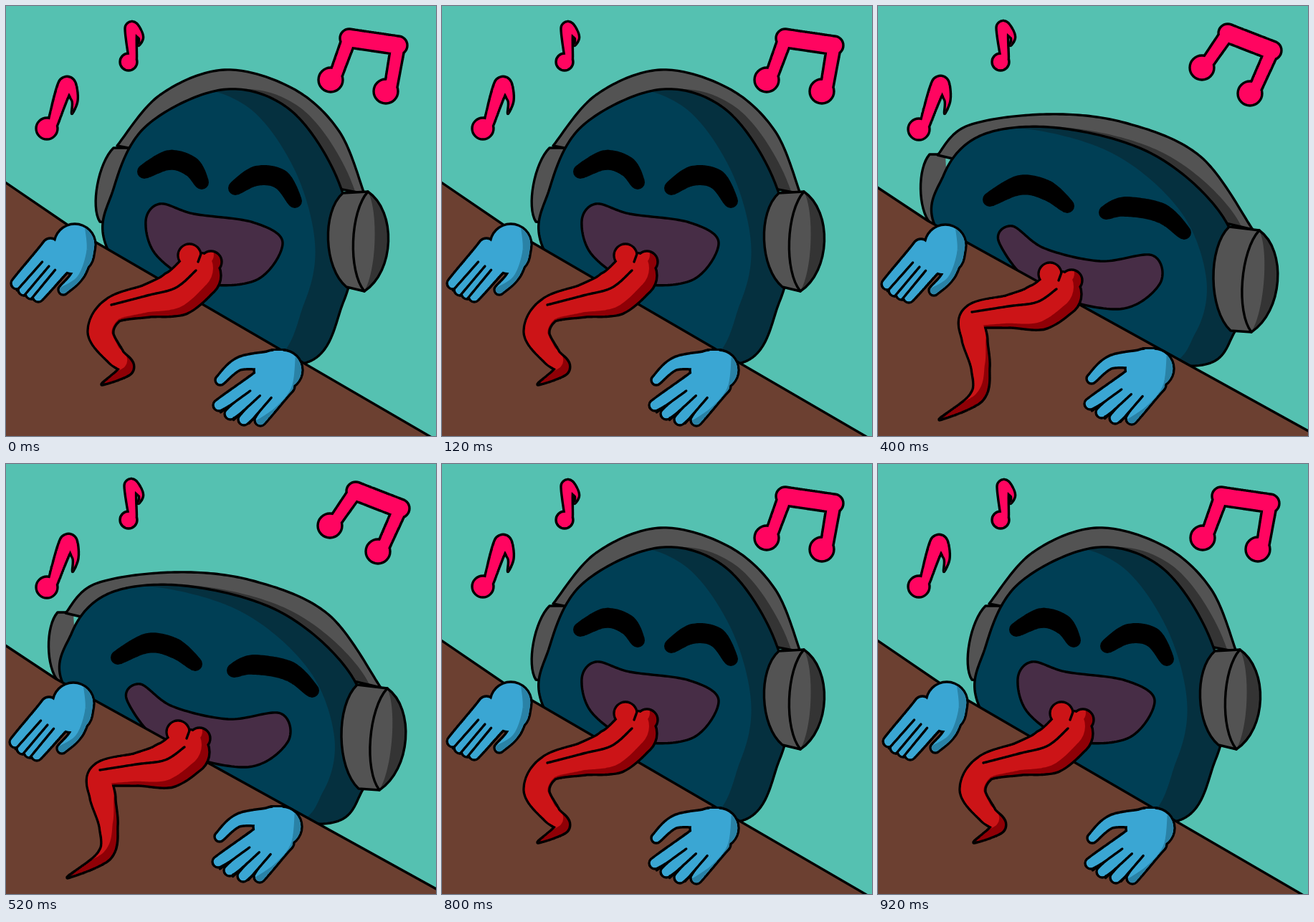
Recreate the animation shown at these times as an HTML page with a canvas. Size 600 by 600 pixels, loop 1 s.

```html
<!DOCTYPE html>
<html lang="en">
<head>
<meta charset="utf-8">
<title>Headphone bop</title>
<style>
  html, body { margin: 0; width: 100%; height: 100%; overflow: hidden; background: #55c1b1; }
  canvas { display: block; width: 100vmin; height: 100vmin; }
</style>
</head>
<body>
<canvas id="stage" width="600" height="600"></canvas>
<script>
const ctx = document.getElementById('stage').getContext('2d');

const INK = '#000', SKY = '#55c1b1', WOOD = '#6c4031', MOUTH = '#472d46', PINK = '#ff0560';
const BODY = ['#003f55', '#05303f'];
const GREY = ['#535353', '#343434'];
const RED = ['#cc1417', '#8f0006'];
const BLUE = ['#3aa6d3', '#2a82a6'];
const LINE = 3.4;

// Key points of each pose; curves run smoothly through them.
const up = {
  table: '-4,244 100,315 594,602',
  body: '142,340 150,255 195,168 300,117 390,140 455,225 485,330 470,415 418,498 250,480',
  band: '155,195 215,124 305,89 400,115 465,175 500,262',
  cupL: '150,198 131,301',
  cupR: '470,261 475,392 505,259 500,398',
  eyes: ['193,231 228,215 258,224 273,246', '320,254 350,237 383,242 403,272'],
  mouth: '195,300 215,276 262,290 345,302 386,330 350,382 270,386 210,348',
  tongue: '268,376 240,400 200,411 150,424 132,455 152,488 168,506 134,528',
  hands: '0,0 0,0',
  pair: '453,103 479,45 547,55 530,119',
  notes: [['57,171 84,110 92,150', 15], ['171,78 175,31 185,55', 12]]
};
const mid = {
  table: '-4,252 80,307 604,600',
  body: '108,330 110,230 160,158 275,131 385,170 472,250 513,350 493,437 430,497 250,470',
  band: '116,186 165,128 240,96 340,108 445,167 513,294',
  cupL: '108,186 82,288',
  cupR: '492,291 485,432 526,292 524,439',
  eyes: ['157,246 190,223 230,232 258,247', '311,257 345,243 390,254 424,284'],
  mouth: '185,300 205,282 258,305 345,306 382,340 345,382 265,386 205,345',
  tongue: '271,376 240,405 200,416 155,428 140,455 148,490 146,520 125,549',
  hands: '-5,1 3,-5',
  pair: '471,125 461,64 527,38 545,97',
  notes: [['59,161 79,119 81,144', 11], ['159,71 187,32 186,62', 12]]
};
const down = {
  table: '-4,251 70,300 604,595',
  body: '87,320 92,235 145,180 250,170 380,205 475,285 512,380 497,456 443,502 250,470',
  band: '83,208 125,167 235,151 345,163 450,210 523,312',
  cupL: '72,207 73,303',
  cupR: '490,308 492,453 532,313 521,455',
  eyes: ['156,270 198,250 235,257 264,279', '318,288 345,280 395,289 427,316'],
  mouth: '169,330 187,307 232,338 310,356 383,348 393,388 335,423 225,395',
  tongue: '252,402 225,420 185,426 134,434 135,465 143,505 138,545 86,577',
  hands: '-2,1 -1,-2',
  pair: '452,86 488,38 550,62 519,122',
  notes: [['57,172 86,109 93,150', 15], ['171,78 174,30 185,55', 12]]
};

const HANDS = [
  { palm: '96,333 94,345', thumb: '108,345 100,375 80,396',
    tips: '15,387 25,396 35,401 45,405', roots: '62,336 72,341 80,347 88,352',
    edge: '122,308 124,345 108,386 72,408', size: 29 },
  { palm: '386,508 374,508', thumb: '370,495 326,499 299,522',
    tips: '297,557 313,569 332,577 355,578', roots: '355,520 365,526 378,530 391,530',
    edge: '416,486 410,535 385,568 350,592', size: 28 }
];

const STEP = 200;
const STEPS = [up, mid, down, mid, up];

const points = s => s.split(' ').map(p => p.split(',').map(Number));
const move = (pts, dx, dy) => pts.map(([x, y]) => [x + dx, y + dy]);
const mix = (a, b, t) => a + (b - a) * t;
const mixPt = (p, q, t) => [mix(p[0], q[0], t), mix(p[1], q[1], t)];

// Catmull-Rom samples, each with its progress from 0 to 1.
function sample(pts, loop) {
  const n = pts.length, spans = loop ? n : n - 1, per = 24, out = [];
  const at = i => loop ? pts[(i + n) % n] : pts[Math.max(0, Math.min(n - 1, i))];
  for (let k = 0; k <= spans * per; k++) {
    const i = Math.min(spans - 1, Math.floor(k / per)), u = k / per - i;
    const [a, b, c, d] = [-1, 0, 1, 2].map(j => at(i + j));
    const axis = m => b[m] + u / 2 * (c[m] - a[m] +
      u * (2 * a[m] - 5 * b[m] + 4 * c[m] - d[m] + u * (3 * (b[m] - c[m]) + d[m] - a[m])));
    out.push([axis(0), axis(1), k / (spans * per)]);
  }
  return out;
}

function curve(pts, loop) {
  const path = new Path2D();
  sample(pts, loop).forEach(([x, y]) => path.lineTo(x, y));
  if (loop) path.closePath();
  return path;
}

function stroke(path, width = LINE, color = INK) {
  ctx.lineWidth = width;
  ctx.strokeStyle = color;
  ctx.stroke(path);
}

function fill(path, color) {
  ctx.fillStyle = color;
  ctx.fill(path);
}

function within(path, paint) {
  ctx.save();
  ctx.clip(path);
  paint();
  ctx.restore();
}

// A tube is [points, radii]; the radii spread evenly along its length.
function tubes(list, grow) {
  const path = new Path2D();
  for (const [pts, radii] of list) {
    for (const [x, y, t] of sample(pts)) {
      const f = t * (radii.length - 1), i = Math.min(radii.length - 2, Math.floor(f));
      const r = Math.max(0.2, mix(radii[i], radii[i + 1], f - i) + grow);
      path.moveTo(x + r, y);
      path.arc(x, y, r, 0, Math.PI * 2);
    }
  }
  return path;
}

function inked(list, color) {
  fill(tubes(list, LINE / 2), INK);
  const inside = tubes(list, -LINE / 2);
  fill(inside, color);
  return inside;
}

const disc = (p, r) => [[p, p], [r, r]];

// Adds a sideways bulge between two points.
function bow(path, a, b, off) {
  const o = off * 4 / 3, p = mixPt(a, b, 0.2), q = mixPt(a, b, 0.8);
  path.bezierCurveTo(p[0] + o, p[1], q[0] + o, q[1], ...b);
}

function lens(a, b, left, right) {
  const path = new Path2D();
  path.moveTo(...a);
  bow(path, a, b, right);
  bow(path, b, a, left);
  return path;
}

function leftCup([top, low]) {
  const path = new Path2D();
  path.moveTo(top[0] + 22, top[1]);
  path.lineTo(...top);
  bow(path, top, low, -13);
  path.lineTo(low[0] + 26, low[1] + 4);
  fill(path, GREY[0]);
  stroke(path);
}

function rightCup([backTop, backLow, top, low]) {
  const side = new Path2D();
  side.moveTo(...top);
  side.lineTo(...backTop);
  bow(side, backTop, backLow, -23);
  side.lineTo(...low);
  fill(side, GREY[0]);
  stroke(side);
  const pad = lens(top, low, -18, 31);
  fill(pad, GREY[0]);
  fill(lens(top, low, 12, 31), GREY[1]);
  stroke(pad);
}

function head(pose) {
  const pts = points(pose.body), body = curve(pts, true);
  const band = curve(points(pose.band));
  band.closePath();
  fill(band, GREY[0]);
  within(band, () => fill(curve(move(pts, 18, 0), true), GREY[1]));
  stroke(band);
  fill(body, BODY[1]);
  within(body, () => fill(curve(move(pts, -54, 0), true), BODY[0]));
  stroke(body);
}

function table(pts) {
  const path = new Path2D(), top = new Path2D();
  pts.forEach(p => { path.lineTo(...p); top.lineTo(...p); });
  path.lineTo(604, 610);
  path.lineTo(-4, 610);
  fill(path, WOOD);
  stroke(top);
}

function tongue(spine) {
  const radii = [32, 32, 23, 18, 18, 13, 10, 1];
  const [x, y] = spine[0];
  const shape = pts => [[pts, radii], ...[[-12, -28, 16], [18, -19, 15]]
    .map(([dx, dy, r]) => disc([pts[0][0] + dx, pts[0][1] + dy], r))];
  const inside = inked(shape(spine), RED[1]);
  // Light falls from the upper left and the shade fades out mid-way.
  const lit = spine.map(([px, py], i) => {
    const k = Math.abs(Math.cos(Math.PI * i / (spine.length - 1)));
    return [px - 11 * k, py - 10 * k];
  });
  within(inside, () => fill(tubes(shape(lit), 0), RED[0]));
  stroke(curve(move(spine.slice(0, 4), -3, -7)));
  stroke(curve([[x + 4, y - 30], [x, y - 19]]));
}

function hand({ palm, thumb, tips, roots, edge, size }, [dx, dy]) {
  const place = s => move(points(s), dx, dy);
  const ends = place(tips), bases = place(roots);
  const parts = [[place(palm), [size, size]], [place(thumb), [14, 9, 7]]];
  ends.forEach((tip, i) => parts.push([[tip, bases[i]], [8, 12]]));
  const inside = inked(parts, BLUE[0]);
  within(inside, () => stroke(curve(place(edge)), 24, BLUE[1]));
  for (let i = 0; i < 3; i++) {
    const from = mixPt(ends[i], ends[i + 1], 0.5), to = mixPt(bases[i], bases[i + 1], 0.5);
    stroke(curve([mixPt(from, to, -0.1), mixPt(from, to, 0.65)]));
  }
}

function pairNote([a, p, q, b]) {
  const stem = (h, top) => [[[h[0] + 7, h[1] - 6], top], [9, 10]];
  inked([disc(a, 17), disc(b, 17), stem(a, p), stem(b, q), [[p, q], [13, 13]]], PINK);
}

function note([h, top, tip], r) {
  const spine = [[h[0] + r * 0.5, h[1] - r * 0.3], top,
    [tip[0] + r * 0.25, mix(top[1], tip[1], 0.5)], tip];
  inked([disc(h, r), [spine, [r * 0.45, r * 0.75, r * 0.3, 0.5]]], PINK);
}

function draw(pose) {
  fill(curve([[0, 0], [600, 0], [600, 600], [0, 600]], true), SKY);
  ctx.fillRect(0, 0, 600, 600);
  leftCup(points(pose.cupL));
  head(pose);
  pose.eyes.forEach(e => fill(tubes([[points(e), [10, 14, 14, 10]]], 0), INK));
  const mouth = curve(points(pose.mouth), true);
  fill(mouth, MOUTH);
  stroke(mouth);
  table(points(pose.table));
  rightCup(points(pose.cupR));
  tongue(points(pose.tongue));
  const shifts = points(pose.hands);
  HANDS.forEach((h, i) => hand(h, shifts[i]));
  pairNote(points(pose.pair));
  pose.notes.forEach(([p, r]) => note(points(p), r));
}

ctx.lineCap = ctx.lineJoin = 'round';
let shown = null;
const start = performance.now();

function tick(now) {
  const t = Math.max(0, now - start);
  const pose = STEPS[Math.floor(t / STEP) % STEPS.length];
  if (pose !== shown) draw(shown = pose);
  requestAnimationFrame(tick);
}
tick(start);
</script>
</body>
</html>
```
